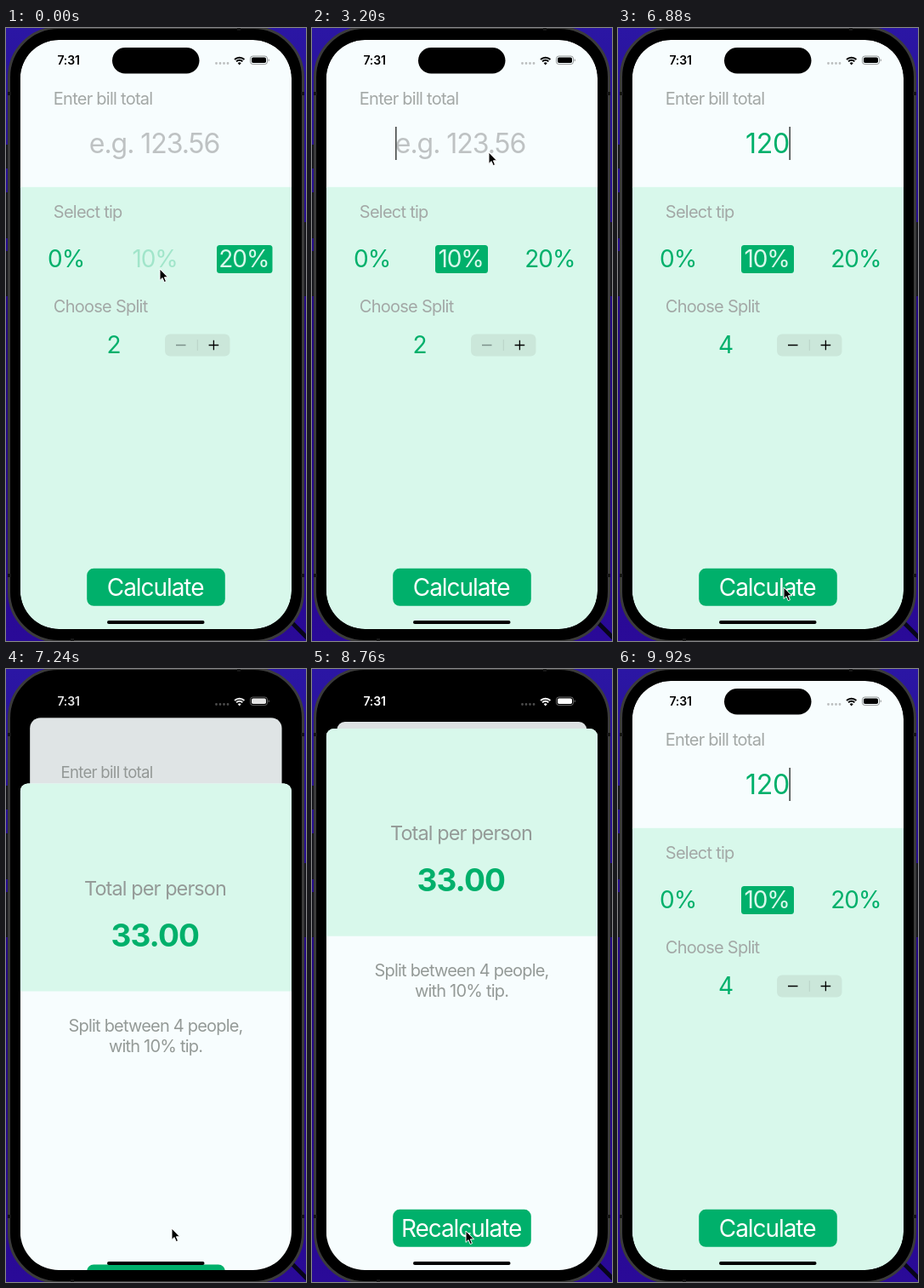
An HTML page for the animation above (9.96 s loop, 353 px wide and 720 px high).

```html
<!DOCTYPE html>
<html lang="en">
<head>
<meta charset="utf-8">
<title>Tip calculator</title>
<style>
  html, body { margin: 0; width: 100%; height: 100%; overflow: hidden; background: #2a0a94; }
  svg { display: block; width: 100vw; height: 100vh; }
  text { font-family: Inter, Roboto, sans-serif; font-optical-sizing: none; letter-spacing: -.04em; }
  .label { font-size: 20px; fill: #a3a8a6; letter-spacing: -.037em; }
  .mid { text-anchor: middle; }
  .field { font-size: 32px; letter-spacing: -.032em; }
  .button { font-size: 28px; letter-spacing: -.038em; }
  .number { letter-spacing: -.008em; }
  .note { font-size: 20px; fill: #949a97; }
</style>
</head>
<body>
<svg viewBox="0 0 353 720">
  <defs>
    <linearGradient id="wall" x2="0" y2="1">
      <stop stop-color="#2b16a4"/><stop offset=".5" stop-color="#220680"/><stop offset="1" stop-color="#2a0a98"/>
    </linearGradient>
    <clipPath id="screen"><rect x="16.7" y="14" width="319.3" height="692" rx="45.5"/></clipPath>
    <clipPath id="cardClip"><rect id="cardShape" x="16.7" y="14" width="319.3" height="692"/></clipPath>
  </defs>

  <rect width="353" height="720" fill="url(#wall)"/>
  <path d="M336 698l20 20" stroke="#07051a" stroke-width="5"/>
  <path d="M1 137v28M1 193v54M1 262v53M352 228v87" stroke="#17171c" stroke-width="3"/>
  <rect x="3.5" y="-.5" width="346" height="721" rx="58.5" stroke="#3b3b3b" stroke-width="3"/>
  <path d="M2 77h4M347 77h4M274 0v3M2 643h4M347 643h4M78 717v3" stroke="#161616" stroke-width="4"/>

  <g clip-path="url(#screen)">
    <g id="card"><g clip-path="url(#cardClip)">
      <rect x="16" y="14" width="321" height="174" fill="#f7fdfe"/>
      <rect x="16" y="186.8" width="321" height="520" fill="#d8f8eb"/>
      <text class="label" x="55.8" y="90">Enter bill total</text>
      <text class="field mid" id="hint" x="174.6" y="147" fill="#bec2c3">e.g. 123.56</text>
      <text class="field number mid" id="bill" x="176" y="147" fill="#00b06b"></text>
      <rect id="caret" y="116" width="1.6" height="39" fill="#454948"/>
      <text class="label" x="55.8" y="223">Select tip</text>
      <g id="tips"></g>
      <text class="label" x="55.8" y="334">Choose Split</text>
      <text class="button mid" id="split" x="126.5" y="382" fill="#00b06b">2</text>
      <rect x="187" y="359.5" width="76.5" height="26" rx="6" fill="#cbe7da"/>
      <rect id="stepPress" x="225" y="359.5" width="38.5" height="26" rx="6" fill="#b4d1c3"/>
      <path d="M225.3 366v13" stroke="#b8d2c6"/>
      <path id="minus" d="M200 372.5h11.5" stroke-width="1.3"/>
      <path d="M238.6 372.5h11.6M244.4 366.7v11.6" stroke="#000" stroke-width="1.3"/>
      <rect x="95.2" y="634.8" width="162.6" height="44" rx="8" fill="#00b06b"/>
      <text class="button mid" id="calculate" x="175.6" y="667" fill="#fff">Calculate</text>
      <rect id="dim" x="16" y="14" width="321" height="692"/>
    </g></g>

    <g id="sheet">
      <rect x="16.7" y="70" width="319.3" height="640" rx="9" fill="#f7fdfe"/>
      <path d="M16.7 313.8V79a9 9 0 0 1 9-9h301.3a9 9 0 0 1 9 9v234.8z" fill="#d8f8eb"/>
      <text class="mid" x="175.5" y="201" font-size="23.5" fill="#949a97" style="letter-spacing:-.039em">Total per person</text>
      <text class="mid" x="175.2" y="261" font-size="37" font-weight="700" fill="#00b06b" style="letter-spacing:-.025em">33.00</text>
      <text class="note mid" x="176" y="361">Split between 4 people,</text>
      <text class="note mid" x="176" y="385">with 10% tip.</text>
      <rect x="95.2" y="634.8" width="162.6" height="44" rx="8" fill="#00b06b"/>
      <text class="button mid" id="recalculate" x="175.6" y="667" fill="#fff">Recalculate</text>
    </g>
    <rect x="119" y="696" width="114.5" height="4" rx="2"/>
  </g>

  <rect x="125" y="23" width="102.5" height="30.5" rx="15.2"/>
  <g id="status">
    <text x="60.4" y="43" font-size="14" font-weight="600" style="letter-spacing:-.01em">7:31</text>
    <path d="M247.5 41.5h14" stroke="#8b8b8b" stroke-opacity=".55" stroke-width="2.8" stroke-linecap="round" stroke-dasharray="0 4.5"/>
    <path d="M269 37a8.2 8.2 0 0 1 11.4 0M271.1 39.4a5 5 0 0 1 7.2 0" fill="none" stroke="currentColor" stroke-width="2"/>
    <path d="M274.7 43.4l-2-2.2a2.8 2.8 0 0 1 4 0z"/>
    <rect x="287.5" y="33" width="20" height="9.6" rx="3" fill="none" stroke="currentColor" stroke-opacity=".4"/>
    <rect x="289" y="34.5" width="17" height="6.6" rx="1.8"/>
    <path d="M308.7 36.2a1.7 1.7 0 0 1 0 3.2z" fill-opacity=".45"/>
  </g>
  <path id="cursor" d="M0 0V13.4L3.1 10.6L5.2 15.6L7.5 14.6L5.4 9.8H9.5Z" stroke="#fff" stroke-width="1"/>
</svg>

<script>
const LOOP = 9960;
const $ = id => document.getElementById(id);
const clamp = v => Math.max(0, Math.min(1, v));
const ramp = (t, start, length) => clamp((t - start) / length);
const within = (t, start, end) => t >= start && t < end;
const last = (steps, t) => steps.filter(s => s[0] <= t).pop();

// [time, x, y] stops of the pointer
const path = [
  [0, 181, 283], [560, 181, 283], [1020, 59, 274], [1500, 59, 274], [1900, 178, 274],
  [2220, 178, 274], [2620, 208, 146], [4480, 208, 146], [5160, 243, 371], [6360, 243, 371],
  [6800, 195, 657], [7600, 195, 657], [8400, 181, 660], [9460, 181, 660], [9880, 343, 724], [LOOP, 343, 724]
];
const tips = [
  { label: '0%', x: 47, width: 49 },
  { label: '10%', x: 145, width: 62 },
  { label: '20%', x: 248, width: 65.5 }
];
// [time, chosen tip]
const choices = [[-1000, 2], [120, 1], [1110, 0], [2040, 1]];
const bills = [[0, ''], [3800, '1'], [4000, '12'], [4240, '120']];
const splits = [[0, 2], [5440, 3], [5920, 4]];

$('tips').innerHTML = tips.map(tip => `
  <rect x="${tip.x}" y="255" width="${tip.width}" height="33" rx="3.5" fill="#00b06b"/>
  <text class="button mid" x="${tip.x + tip.width / 2 - .9}" y="281">${tip.label}</text>`).join('');
const fills = [...$('tips').querySelectorAll('rect')];
const names = [...$('tips').querySelectorAll('text')];

function spring(ms) {
  const x = Math.max(0, ms) * .0138;
  return 1 - (1 + x) * Math.exp(-x);
}

function pointer(t) {
  const i = path.findIndex(p => p[0] > t);
  const [t0, x0, y0] = path[i - 1], [t1, x1, y1] = path[i];
  const u = (t - t0) / (t1 - t0), k = u * u * (3 - 2 * u);
  return [x0 + (x1 - x0) * k, y0 + (y1 - y0) * k];
}

function drawTips(t) {
  const index = choices.indexOf(last(choices, t));
  const [since, chosen] = choices[index];
  const previous = index ? choices[index - 1][1] : -1;
  tips.forEach((tip, i) => {
    const on = i === chosen;
    const fill = on ? ramp(t, since, 105) : i === previous ? 1 - ramp(t, since, 200) : 0;
    const pressed = choices.some(([at, n]) => n === i && within(t, at - 130, at));
    fills[i].setAttribute('opacity', fill);
    names[i].setAttribute('fill', on ? '#d8f8eb' : '#00b06b');
    names[i].setAttribute('opacity', pressed ? .25 : on ? .25 + .75 * ramp(t, since + 60, 150) : 1);
  });
}

function drawForm(t) {
  const bill = last(bills, t)[1];
  $('bill').textContent = bill;
  $('hint').setAttribute('opacity', bill ? 0 : 1);
  const edge = bill ? 176 + $('bill').getComputedTextLength() / 2 - .6 : 98;
  const lit = within(t, 3440, 4500) || (t + 150) % 1000 < 550;
  $('caret').setAttribute('x', edge);
  $('caret').setAttribute('opacity', t > 2720 && lit ? 1 : 0);

  const split = last(splits, t)[1];
  $('split').textContent = split;
  $('minus').setAttribute('stroke', split > 2 ? '#000' : '#7d918a');
  const stepping = splits.slice(1).some(([at]) => within(t, at, at + 120));
  $('stepPress').setAttribute('opacity', stepping ? 1 : 0);
  $('calculate').setAttribute('opacity', within(t, 6920, 7000) ? .25 : 1);
  $('recalculate').setAttribute('opacity', within(t, 8800, 8920) ? .25 : 1);
}

function drawSheet(t) {
  const p = t < 8920 ? spring(t - 6960) : 1 - spring(t - 8920);
  const scale = 1 - .08 * p;
  $('sheet').setAttribute('transform', `translate(0 ${(1 - p) * 640})`);
  $('card').setAttribute('transform',
    `translate(${176.4 * (1 - scale)} ${14 + 48 * p - 14 * scale}) scale(${scale})`);
  $('cardShape').setAttribute('rx', 45.5 - 35.5 * p);
  $('dim').setAttribute('opacity', .11 * p);
  const shade = Math.round(255 * p);
  const color = `rgb(${shade},${shade},${shade})`;
  $('status').setAttribute('color', color);
  $('status').setAttribute('fill', color);
}

function frame(now) {
  const t = now % LOOP;
  drawTips(t);
  drawForm(t);
  drawSheet(t);
  $('cursor').setAttribute('transform', `translate(${pointer(t)})`);
  requestAnimationFrame(frame);
}
frame(0);
</script>
</body>
</html>
```
